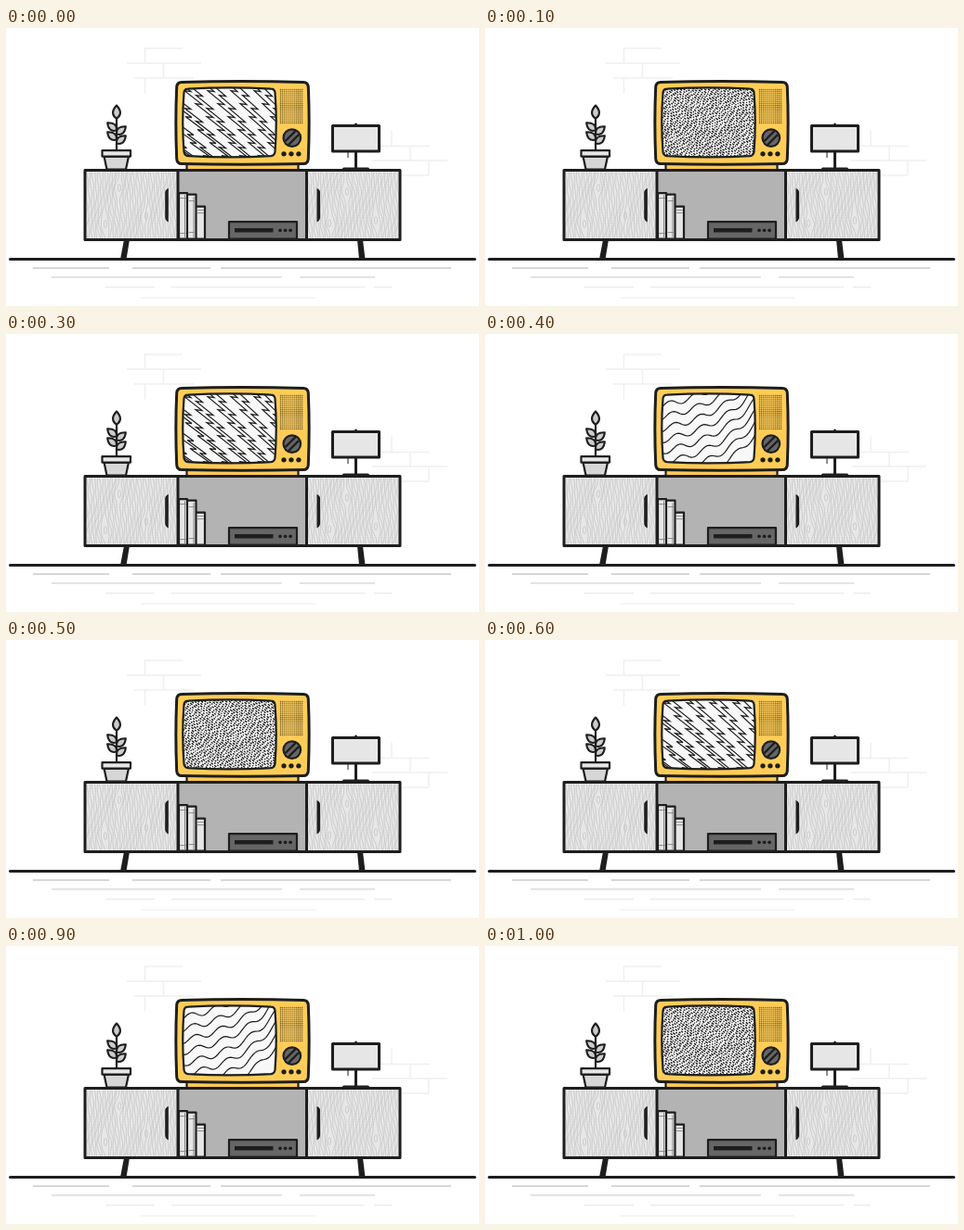
Write an HTML page that moves like this. It is 509 by 300 pixels and loops after 1100 ms.

```html
<!DOCTYPE html>
<html lang="en">
<head>
<meta charset="utf-8">
<title>Retro television</title>
<style>
html, body { margin: 0; width: 100%; height: 100%; overflow: hidden; background: #fff; }
svg { display: block; width: 509px; height: 300px; }
.ink { stroke: #1e1e1e; stroke-width: 3; stroke-linejoin: round; stroke-linecap: round; }
.mid { stroke-width: 2.2; }
.fine { stroke-width: 1; }
.faint { fill: none; stroke: #efefef; stroke-width: 1.5; }
.grain { fill: none; stroke: #c4c4c4; stroke-width: .8; }
.dark { fill: #1e1e1e; }
.picture { fill: none; stroke: #1e1e1e; visibility: hidden; animation: 1.1s step-end infinite; }
#bolts { animation-name: bolts; stroke-width: 1.2; }
#noise { animation-name: noise; stroke-width: 1.4; }
#waves { animation-name: waves; stroke-width: 1.2; }
@keyframes bolts {
  0%, 27.27%, 54.54%, 72.72% { visibility: visible; }
  9.09%, 36.36%, 63.63%, 81.81%, 100% { visibility: hidden; }
}
@keyframes noise {
  9.09%, 45.45%, 90.9% { visibility: visible; }
  0%, 18.18%, 54.54%, 100% { visibility: hidden; }
}
@keyframes waves {
  18.18%, 36.36%, 63.63%, 81.81% { visibility: visible; }
  0%, 27.27%, 45.45%, 72.72%, 90.9%, 100% { visibility: hidden; }
}
</style>
</head>
<body>
<svg viewBox="0 .4 509 300">
  <defs>
    <path id="glass" d="M196 66Q240 63.500 285 66Q289 66 289.500 70Q292 102 289.500 134Q289 138 285 138.500Q240 141 196 138.500Q192 138 191.500 134Q189 102 191.500 70Q192 66 196 66Z"/>
    <clipPath id="screen"><use href="#glass"/></clipPath>
    <clipPath id="doors"><path d="M86 155H184V228H86ZM325 155H423V228H325Z"/></clipPath>
    <pattern id="mesh" x="294.500" y="66" width="2.100" height="2.100" patternUnits="userSpaceOnUse">
      <circle class="dark" cx="1.050" cy="1.050" r=".66" opacity=".75"/>
    </pattern>
    <path id="leaf" d="M0 0C-5.500 -4 -5 -8.500 0 -14C5 -8.500 5.500 -4 0 0Z"/>
    <g id="pair">
      <use href="#leaf" transform="rotate(-50) scale(.92)"/>
      <use href="#leaf" transform="translate(0 4) rotate(50) scale(.92)"/>
    </g>
    <g id="dots" class="dark"><circle r="1"/><circle cx="3" r="1"/><circle cx="6" r="1"/></g>
  </defs>

  <!-- wall and floor -->
  <path class="faint" d="M149 22.500H190M130 38.500H210M138 54.500H202M149.500 22V38M169.500 38V54M149.500 54V71M403 128H456M394 143.500H475M424 159.500H455M415 111V128M435 128V143M455 143V159"/>
  <g fill="none" stroke-width="1.800">
    <path stroke="#d2d2d2" d="M29 259.500H111M136 259.500H220M231 259.500H479"/>
    <path stroke="#e0e0e0" d="M49 269.300H297M316 269.300H397"/>
    <path stroke="#eee" d="M107 280H160M178 280H386M396 280H415"/>
    <path stroke="#f4f4f4" d="M145 291.500H333"/>
  </g>

  <!-- cabinet -->
  <path class="dark" d="M127 229H133L129.500 250H123ZM378 229H384L386.500 250H380Z"/>
  <path class="ink" d="M4.500 250H504.500"/>
  <path fill="#e7e7e7" d="M85 154H424V229H85Z"/>
  <path fill="#b3b3b3" d="M185 154H323.500V229H185Z"/>
  <g id="wood" class="grain" clip-path="url(#doors)"></g>
  <g class="ink mid" fill="#e6e6e6">
    <path d="M186 178.500H195V228H186ZM195 180H204.500V228H195ZM204.500 193H214V228H204.500Z"/>
    <path class="fine" fill="none" stroke="#888" d="M192.500 181V226M202 183V226M187.500 184H193.500M197 187H203M206.500 197H212.500M206.500 200H212.500M187.500 222H193.500M197 221H203"/>
    <path fill="#666" d="M240 209.500H313V228H240Z"/>
  </g>
  <path class="dark" d="M246 216.500H287.500V221H246Z"/>
  <use href="#dots" transform="translate(295 218.700) scale(1.850)"/>
  <path class="ink" fill="none" d="M85 154H424V229H85ZM185 154V229M323.500 154V229"/>
  <path class="dark" d="M174.800 173.500V210Q171.200 208 171.200 204.500V178Q171.200 175 174.800 173.500ZM334.500 173.500V210Q338.100 208 338.100 204.500V178Q338.100 175 334.500 173.500Z"/>

  <!-- plant -->
  <g class="ink mid" fill="#ccc">
    <path fill="none" d="M119 97V132"/>
    <use href="#leaf" x="119" y="98"/>
    <use href="#pair" x="119" y="111"/>
    <use href="#pair" x="119" y="121"/>
    <path fill="#d6d6d6" d="M105.500 139H132L129 153H108.500Z"/>
    <path fill="#e6e6e6" d="M103.500 132.500H134V139H103.500Z"/>
  </g>

  <!-- lamp -->
  <g class="ink">
    <path fill="none" d="M376.500 104.500V106M376.500 134V152M363.500 152.500H389.500"/>
    <path class="fine" fill="none" d="M368 134V140"/>
    <path fill="#e6e6e6" d="M351.500 106H401.500V133.500H351.500Z"/>
  </g>

  <!-- television -->
  <path class="ink mid" fill="#fdca56" d="M194.500 146H314.500V153.500H194.500Z"/>
  <path class="ink" fill="#ffcd57" d="M189 58.800Q254 57 320 58.800Q325 59 325.300 64Q327 102 325.300 141.500Q325 147 320 147Q254 148.500 189 147Q184 147 183.700 141.500Q182 102 183.700 64Q184 59 189 58.800Z"/>
  <path fill="url(#mesh)" d="M294.500 66H320V104H294.500Z"/>
  <circle class="ink mid" cx="307.800" cy="119" r="9.300" fill="#666"/>
  <path class="ink mid" fill="none" d="M301 122L311 112M304.500 126L314.500 116"/>
  <use href="#dots" transform="translate(299 136.200) scale(2.650)"/>
  <use href="#glass" fill="#f8f8f8"/>
  <g clip-path="url(#screen)">
    <path id="bolts" class="picture"/>
    <path id="noise" class="picture"/>
    <path id="waves" class="picture"/>
  </g>
  <use href="#glass" class="ink mid" fill="none"/>
</svg>
<script>
const byId = id => document.getElementById(id);
const draw = (id, d) => byId(id).setAttribute('d', d);

let seed = 7;
const rand = () => (seed = (seed * 16807) % 2147483647) / 2147483647;

// Polyline of x(t), y(t) for t from start to end.
function trace(start, end, step, point) {
  const points = [];
  for (let t = start; t <= end; t += step) points.push(point(t).map(v => v.toFixed(1)));
  return 'M' + points.join('L');
}

// Ridges that climb to the right, with ripples drifting from line to line.
let waves = '';
for (let k = 0; k < 8; k++) {
  waves += trace(-2, 104, 2, u => {
    const ripple = 3.2 * Math.cos((u - 36 - 2.5 * k) * Math.PI / 13.5);
    return [190 + u, 78 + 12.4 * k - .25 * u - 3e-5 * u ** 3 - ripple];
  });
}
draw('waves', waves);

// Diagonals broken by lightning-like jogs, steeper towards the right.
let bolts = '';
for (let k = -8; k < 9; k++) {
  const run = 19 - k * .5;
  bolts += `M${180 + k * 13} ${54 + (k & 1) * 5}` + `l${run} 15l-7 -1`.repeat(8);
}
draw('bolts', bolts);

// Short random dashes laid along diagonal rows.
let noise = '';
for (let row = -16; row < 142; row += 2.8) {
  for (let x = 189 + rand() * 2; x < 292;) {
    const length = .8 + rand() * 1.8;
    noise += trace(x, x + length, length, t => [t, row + (t - 190) * .75]);
    x += length + .7 + rand() * 1.2;
  }
}
draw('noise', noise);

// Wood grain flows around a few knots on each door.
function grain(left, knots) {
  let d = '';
  for (let x0 = left - 4; x0 < left + 104; x0 += 2.5) {
    d += trace(153, 231, 3, y => {
      let x = x0 + 1.3 * Math.sin(y * .09 + x0 * .11) + .5 * Math.sin(y * .31 + x0);
      for (const [kx, ky] of knots) {
        const dx = x0 - left - kx, dy = (y - ky) / 10;
        x += Math.sign(dx) * 3.6 * Math.exp(-dy * dy - Math.abs(dx) / 9);
      }
      return [x, y];
    });
  }
  return `<path d="${d}"/>` + knots.map(([kx, ky]) =>
    `<ellipse cx="${left + kx}" cy="${ky}" rx="1.6" ry="4"/>`).join('');
}
byId('wood').innerHTML =
  grain(85, [[37, 173], [66, 203], [22, 212]]) +
  grain(324, [[43, 177], [74, 208], [24, 211]]);
</script>
</body>
</html>
```
